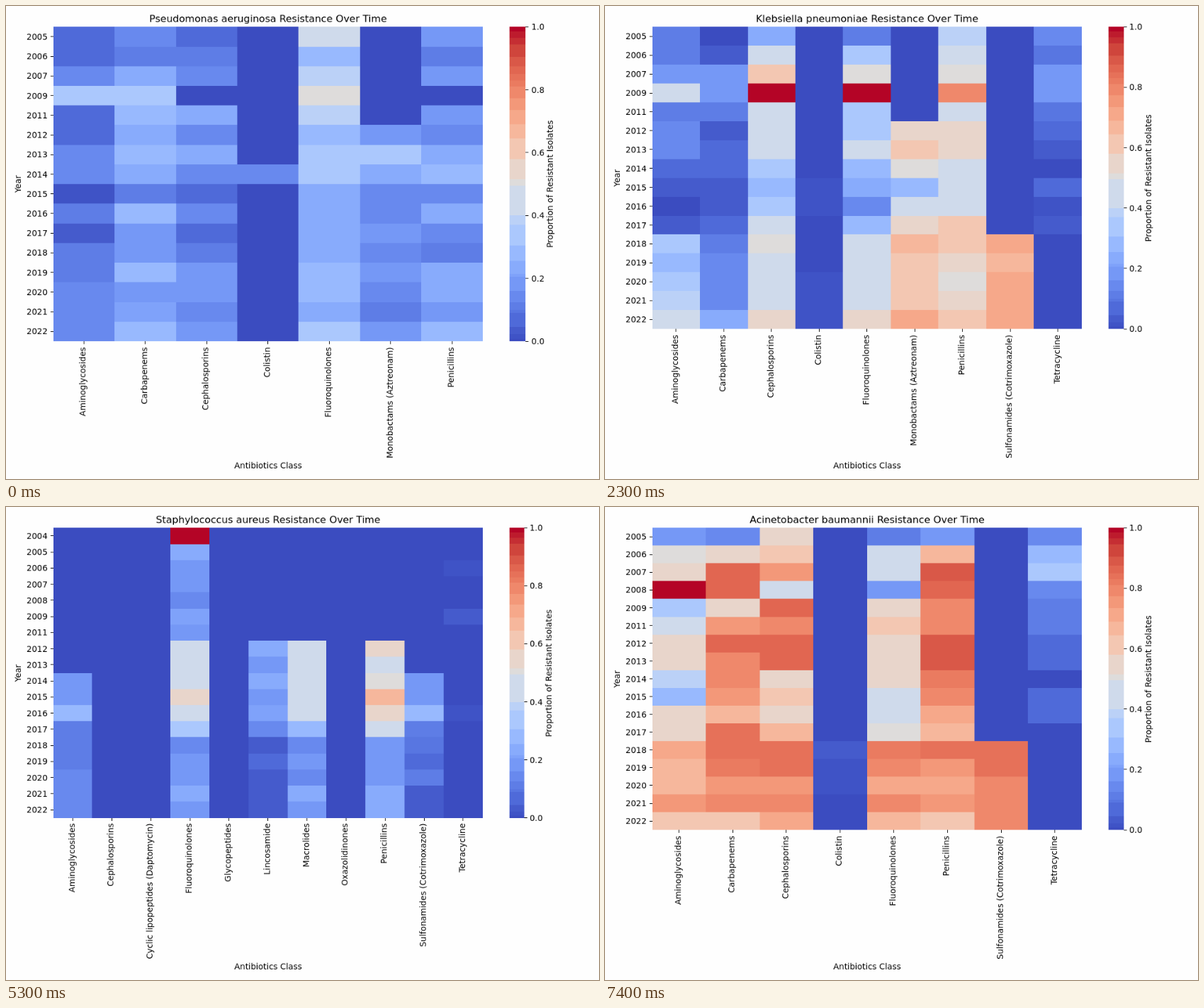
Animation of 837 by 669 pixels, one loop 8 s. Source, as an HTML page with a canvas:

```html
<!DOCTYPE html>
<html lang="en">
<head>
<meta charset="utf-8">
<title>Resistance Over Time</title>
<style>
  html, body { margin: 0; width: 100%; height: 100%; overflow: hidden; background: #fefefe; }
  canvas { display: block; width: 837px; height: 669px; }
</style>
</head>
<body>
<canvas id="stage" width="1000" height="800"></canvas>
<script>
// The figure is laid out on 1000 x 800 whole pixels and scaled to the stage by CSS.
const ctx = document.getElementById('stage').getContext('2d');
const LOOP = 8000;
const LEFT = 79.63, RIGHT = 803.8, TOP = 35.3, BAR_X = 849.2;
const FONT = '"DejaVu Sans", sans-serif', SMALL = 13.89, LARGE = 16.67;
const TICK = 4.86, PAD = 9.72;

// Diverging blue-red ramp, evenly spaced stops
const RAMP = ['3b4cc0', '4d68d7', '6282ea', '779af7', '8db0fe', 'a3c2ff', 'b8d0f9', 'ccd9ee', 'dddddd',
  'ecd3c5', 'f5c4ad', 'f7b194', 'f49a7b', 'ec7f63', 'de604d', 'cb3e38', 'b40426']
  .map(hex => [0, 2, 4].map(i => parseInt(hex.slice(i, i + 2), 16)));

// Upper edges of the colour bands
const EDGES = [.008, .022, .045, .09, .1, .125, .16, .205, .215, .255, .305, .37, .4, .495, .515, .58, .645, .69,
  .735, .773, .81, .83, .85, .875, .905, .945, .965, .985, 1];

function ramp(v) {
  const p = v * (RAMP.length - 1), i = Math.min(Math.floor(p), RAMP.length - 2);
  return `rgb(${RAMP[i].map((c, k) => Math.round(c + (RAMP[i + 1][k] - c) * (p - i)))})`;
}

const BANDS = EDGES.map((to, i) => {
  const from = i ? EDGES[i - 1] : 0;
  return { from, to, color: ramp(i === 0 ? 0 : to === 1 ? 1 : (from + to) / 2) };
});
const colorOf = percent => BANDS.find(b => percent / 100 <= b.to).color;

// Years up to 2022 without the skipped ones
const years = (first, ...skipped) =>
  Array.from({ length: 2023 - first }, (_, i) => first + i).filter(y => !skipped.includes(y));

// "0*3 14" means 0 0 0 14
const series = text => text.split(' ').flatMap(part => {
  const [value, count = 1] = part.split('*').map(Number);
  return Array(count).fill(value);
});

// Percent resistant per year, by antibiotic class
const charts = [
  {
    start: 0, species: 'Pseudomonas aeruginosa', bottom: 567, years: years(2005, 2008, 2010),
    data: {
      'Aminoglycosides': '7*2 14 33 7*2 14*2 2 11 4 11*2 14*3',
      'Carbapenems': '14 11 23 33 28 23 28 23 11 28 18*2 28 18 21 28',
      'Cephalosporins': '9 11 14 0 23 14 23 14 8 14 8 11 18*2 14 18',
      'Colistin': '0*7 14 0*8',
      'Fluoroquinolones': '44 28 39 50 39 28 33*2 23*4 28*2 23 33',
      'Monobactams (Aztreonam)': '0*5 18 33 23 14*2 18 14 18 14 11 18',
      'Penicillins': '18 11 18 0 18 14 23 28 14 23 14 11 23*2 18 28'
    }
  },
  {
    start: 500, species: 'Klebsiella pneumoniae', bottom: 546.1, years: years(2005, 2008, 2010),
    data: {
      'Aminoglycosides': '11*2 18 44 11 14*2 8 4 0 4 33 28 33 39 44',
      'Carbapenems': '0 4 18*2 11 4 8*2 4*2 8 11 14*3 23',
      'Cephalosporins': '23 44 60 100 44*3 33 28 33 44 50 44*3 54',
      'Colistin': '0*8 2*2 0*3 2*3',
      'Fluoroquinolones': '11 33 50 100 33*2 44 28 23 14 28 44*4 54',
      'Monobactams (Aztreonam)': '0*5 54 60 50 28 44 54 66 60*3 72',
      'Penicillins': '39 44 50 80 44 54*2 44*3 60*2 54 50 54 60',
      'Sulfonamides (Cotrimoxazole)': '0*11 72 67 72*3',
      'Tetracycline': '14 10 18*2 10 7 4 0 7 2 4 0*5'
    }
  },
  {
    start: 3500, species: 'Staphylococcus aureus', bottom: 525.7, years: years(2004, 2010),
    data: {
      'Aminoglycosides': '0*9 18*2 28 11*3 14*3',
      'Cephalosporins': '0*18',
      'Cyclic lipopeptides (Daptomycin)': '0*18',
      'Fluoroquinolones': '100 23 18*2 14 21 18 44*3 54 44 33 14 18*2 23 18',
      'Glycopeptides': '0*18',
      'Lincosamide': '0*7 23 18 23 18 21 14 4 8 4*3',
      'Macrolides': '0*7 44*5 28 14 18 14 23 18',
      'Oxazolidinones': '0*18',
      'Penicillins': '0*7 54 44 50 67 54 44 18*3 23*2',
      'Sulfonamides (Cotrimoxazole)': '0*9 18*2 28 11 10 7 11 4*2',
      'Tetracycline': '0*2 2 0*2 4 0*5 2 0*6'
    }
  },
  {
    start: 6500, species: 'Acinetobacter baumannii', bottom: 546.1, years: years(2005, 2010),
    data: {
      'Aminoglycosides': '18 50 54 100 33 44 54*2 39 28 54*2 72 67*2 75 62',
      'Carbapenems': '14 54 86*2 54 75 86 80*2 75 67 84*2 82 75 80 60',
      'Cephalosporins': '54 60 75 44 86 80 86*2 54 60 54 67 84*2 75 80 72',
      'Colistin': '0*12 4 2*2 0*2',
      'Fluoroquinolones': '11 44*2 18 54 60 54*3 44*2 50 82 80 72 80 65',
      'Penicillins': '18 67 89 86 80*2 89*2 82 80 72 67 84 75 72 75 60',
      'Sulfonamides (Cotrimoxazole)': '0*12 84*2 80*3',
      'Tetracycline': '14 28 33 14 11*2 7*2 0 7*2 0*6'
    }
  }
];

function fill(x0, y0, x1, y1, color) {
  const [l, t, r, b] = [x0, y0, x1, y1].map(Math.round);
  ctx.fillStyle = color;
  ctx.fillRect(l, t, r - l, b - t);
}

function label(text, x, y, align, { size = SMALL, upright = false } = {}) {
  ctx.save();
  ctx.translate(Math.round(x), Math.round(y));
  if (upright) ctx.rotate(-Math.PI / 2);
  ctx.font = `${size}px ${FONT}`;
  ctx.textAlign = align;
  ctx.fillStyle = '#000';
  ctx.fillText(text, 0, 0);
  ctx.restore();
}

const tickX = (x, y) => fill(x, Math.floor(y), x + TICK, Math.floor(y) + 1, '#000');
const tickY = (x, y) => fill(Math.floor(x), y, Math.floor(x) + 1, y + TICK, '#000');

function drawChart({ species, bottom, years, data }) {
  const height = bottom - TOP, middleX = (LEFT + RIGHT) / 2, middleY = (TOP + bottom) / 2;
  const classes = Object.keys(data);
  const cellW = (RIGHT - LEFT) / classes.length, cellH = height / years.length;

  fill(0, 0, 1000, 800, '#fefefe');
  label(`${species} Resistance Over Time`, middleX, 27, 'center', { size: LARGE });
  label('Antibiotics Class', middleX, 782, 'center');
  label('Year', 25, middleY, 'center', { upright: true });

  classes.forEach((name, col) => {
    const x = LEFT + col * cellW;
    series(data[name]).forEach((percent, row) => {
      const y = TOP + row * cellH;
      fill(x, y, x + cellW, y + cellH, colorOf(percent));
    });
    tickY(x + cellW / 2, bottom);
    label(name, x + cellW / 2 + 3, bottom + PAD, 'right', { upright: true });
  });

  years.forEach((year, row) => {
    const y = TOP + (row + .5) * cellH;
    tickX(LEFT - TICK, y);
    label(year, LEFT - PAD, y + 5, 'right');
  });

  const barRight = BAR_X + height / 20;
  for (const { from, to, color } of BANDS)
    fill(BAR_X, bottom - to * height, barRight, bottom - from * height, color);
  for (let i = 0; i <= 5; i++) {
    const y = bottom - height * i / 5;
    tickX(barRight, y);
    label((i / 5).toFixed(1), barRight + PAD, y + 5, 'left');
  }
  label('Proportion of Resistant Isolates', barRight + 46.3, middleY, 'center', { upright: true });
}

let shown;
function frame() {
  const time = performance.now() % LOOP;
  const chart = charts.findLast(c => c.start <= time);
  if (chart !== shown) drawChart(shown = chart);
  requestAnimationFrame(frame);
}
frame();
</script>
</body>
</html>
```
